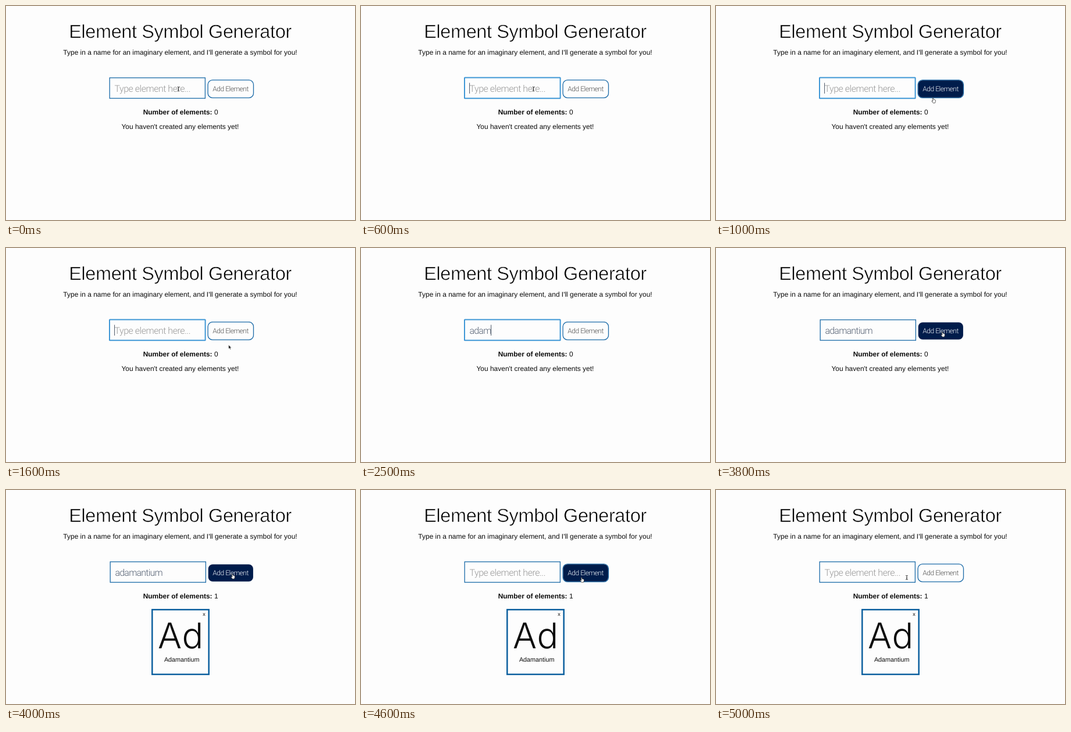
An HTML page for the animation above (5.1 s loop, 600 by 369 pixels).

```html
<!DOCTYPE html>
<html lang="en">
<head>
<meta charset="utf-8">
<title>Element Symbol Generator</title>
<style>
  html, body { margin: 0; width: 100%; height: 100%; overflow: hidden; background: #fdfdfd; }
  svg { display: block; width: 100%; height: 100%; }
  text {
    font: 11.96px "Liberation Sans", Arial, sans-serif;
    fill: #0c0c0c; white-space: pre; text-rendering: geometricPrecision;
  }
  .mid { text-anchor: middle; }
  /* The page-coloured outline thins the letters to a light weight. */
  .title { font-size: 32.5px; letter-spacing: -.012em; fill: #000; stroke: #fdfdfd; stroke-width: .7; }
  .bold { font-weight: 700; }
  .field { font: 300 16px Roboto, sans-serif; }
  .hint { letter-spacing: -.03em; fill: #999; }
  .typed { letter-spacing: -.05em; fill: #566274; }
  .label { font: 300 12px Roboto, sans-serif; letter-spacing: -.04em; }
  .symbol { font: 300 61px Inter, sans-serif; }
  .name { font-size: 10.8px; }
  .close { font-size: 9px; }
  .line { fill: none; stroke: #1c6ba8; stroke-width: 1.3; }
  .focus { fill: none; stroke: #3f97d6; stroke-width: 2; }
  .cursor { stroke-linejoin: round; }
</style>
</head>
<body>
<svg viewBox="0 0 600 369">
  <text class="title mid" x="299.5" y="54.8">Element Symbol Generator</text>
  <text class="mid" x="299.5" y="84.2">Type in a name for an imaginary element, and I'll generate a symbol for you!</text>

  <g id="input">
    <rect id="border" class="line" x="178.2" y="123.8" width="164.2" height="35.4"/>
    <rect id="focus" class="focus" x="178" y="123.5" width="164.6" height="35.8" rx=".5"/>
    <text id="value" class="field" x="186.5" y="147.8"></text>
    <path id="caret" d="M0 132.5V151" stroke="#4a5566" stroke-width="1"/>
  </g>

  <g id="button">
    <rect id="edge" class="line" x="347.1" y="127.6" width="78.4" height="30.8" rx="8"/>
    <text class="label" x="355.3" y="147.3" fill-opacity=".72">Add Element</text>
    <g id="hover">
      <rect x="347.7" y="128.2" width="77.2" height="29.6" rx="7.5" fill="#001c4b"/>
      <text class="label" x="355.3" y="147.3" style="fill:#f4f6fa">Add Element</text>
    </g>
  </g>

  <text class="mid" x="300.1" y="186.5"><tspan class="bold">Number of elements:</tspan> <tspan id="count">0</tspan></text>
  <text id="empty" class="mid" x="299.4" y="212.2">You haven't created any elements yet!</text>

  <g id="card">
    <rect x="251.3" y="206.3" width="97.4" height="111.6" fill="none" stroke="#0b5f9e" stroke-width="2.5"/>
    <text class="close" x="338.3" y="217.3">x</text>
    <text class="symbol" x="261 302.5" y="272.8">Ad</text>
    <text class="name mid" x="302.2" y="296">Adamantium</text>
  </g>

  <g id="beam" class="cursor" fill="none" stroke="#222" stroke-width=".9">
    <path d="M-1.8 -3.6Q0 -3.6 0 -2.6Q0 -3.6 1.8 -3.6M0 -2.8V2.8M-1.8 3.6Q0 3.6 0 2.6Q0 3.6 1.8 3.6M-.9 .8H.9"/>
  </g>
  <g id="hand" class="cursor" fill="#fff" stroke="#222" stroke-width=".7">
    <path d="M-1.6 -4.2Q-.9 -4.9 -.4 -4.1L.3 -1.6L1.9 -1.6L3.3 -.8L3.4 1.6L2.5 4.2H-.8L-3 1.2Q-3.2 .2 -2.2 .3L-1.1 1.2Z"/>
  </g>
  <g id="arrow" class="cursor" fill="#111" stroke="#fff" stroke-width=".5">
    <path d="M0 0V6.6L1.5 5.3L2.6 7.9L3.8 7.4L2.7 4.9H4.8Z"/>
  </g>
</svg>
<script>
  const LOOP = 5100;
  const HINT = "Type element here...";
  const WORD = "adamantium";
  const $ = id => document.getElementById(id);
  const show = (id, on) => $(id).setAttribute("visibility", on ? "visible" : "hidden");

  // Each step keeps the values of the one before unless it changes them.
  const START = { typed: 0, focus: 0, caret: 0, hover: 0, pressed: 0, made: 0, cursor: ["beam", 296.5, 143] };
  const CHANGES = [
    [600, { focus: 1, caret: 1 }],
    [800, { cursor: ["beam", 322, 148] }],
    [900, { cursor: ["hand", 357, 157], hover: .6 }],
    [1000, { cursor: ["hand", 374, 163], hover: 1 }],
    [1100, { cursor: ["hand", 380, 168], hover: .6, caret: 0 }],
    [1200, { cursor: ["hand", 384, 170.5], hover: .2 }],
    [1300, { cursor: ["hand", 385, 171], hover: 0 }],
    [1400, { cursor: ["arrow", 382.7, 167.2] }],
    [1600, { caret: 1 }],
    [2000, { cursor: null, typed: 1 }],
    [2200, { typed: 2 }],
    [2300, { typed: 3 }],
    ...[4, 5, 6, 7, 8, 9, 10].map((n, i) => [2500 + i * 100, { typed: n }]),
    [3600, { cursor: ["hand", 388, 158], hover: .6 }],
    [3700, { cursor: ["hand", 390, 150], hover: 1 }],
    [3800, { cursor: ["hand", 390, 149], pressed: 1, focus: 0, caret: 0 }],
    [3900, { made: 1 }],
    [4200, { pressed: 0, typed: 0 }],
    [4600, { cursor: ["hand", 380, 155] }],
    [4700, { cursor: ["hand", 363, 161], hover: .6 }],
    [4800, { cursor: ["arrow", 343, 158], hover: .2 }],
    [4900, { cursor: ["beam", 331, 153], hover: 0 }],
    [5000, { cursor: ["beam", 328, 151] }]
  ];

  function stateAt(t) {
    const state = { ...START };
    for (const [at, change] of CHANGES) if (t >= at) Object.assign(state, change);
    return state;
  }

  function draw(t) {
    const s = stateAt(t);
    const value = $("value");
    value.textContent = s.typed ? WORD.slice(0, s.typed) : HINT;
    value.setAttribute("class", s.typed ? "field typed" : "field hint");

    const end = s.typed ? value.getComputedTextLength() : 0;
    $("caret").setAttribute("transform", `translate(${186.6 + end} 0)`);
    show("caret", s.caret);
    show("border", !s.focus);
    show("focus", s.focus);
    $("input").setAttribute("transform", `translate(${s.pressed} 0)`);

    $("hover").setAttribute("opacity", s.hover);
    show("edge", !s.pressed);
    $("count").textContent = s.made;
    show("empty", !s.made);
    show("card", s.made);

    for (const id of ["beam", "hand", "arrow"]) show(id, s.cursor && s.cursor[0] === id);
    if (s.cursor) {
      const [id, x, y] = s.cursor;
      $(id).setAttribute("transform", `translate(${x} ${y})`);
    }
  }

  const begin = performance.now();
  function tick() {
    draw((performance.now() - begin) % LOOP);
    requestAnimationFrame(tick);
  }
  tick();
</script>
</body>
</html>
```
